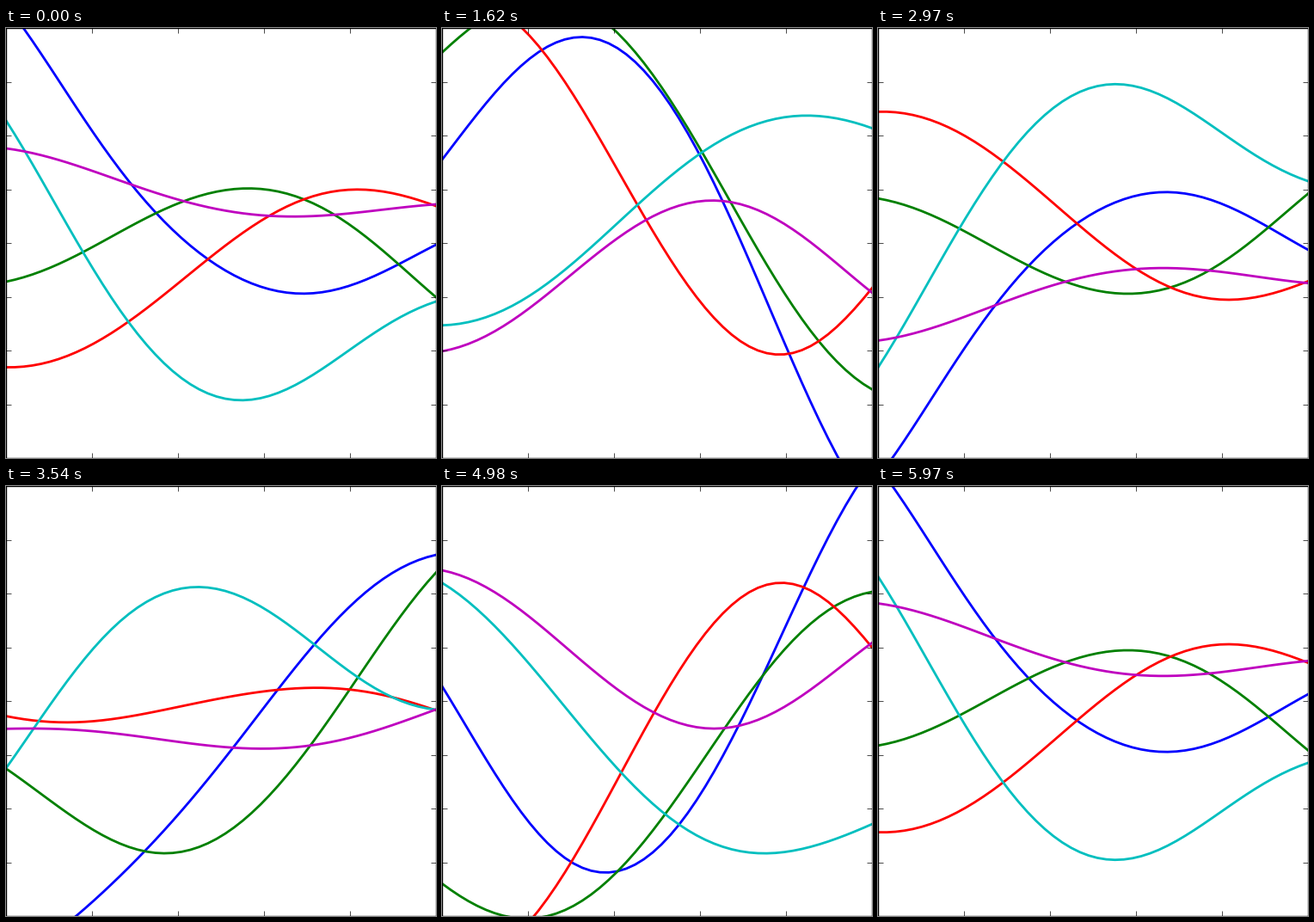
A matplotlib script that plays this animation: 500x500 px, repeating every 6000 ms.

```python
import numpy as np
import matplotlib.pyplot as plt
from matplotlib.animation import FuncAnimation

plt.style.use("classic")

SIZE = 500
FRAMES = 200
INTERVAL = 30
LENGTH = 1.7  # kernel length scale

# Heights at x = 0..5 as a + bj: each point swings as a cos(t) + b sin(t).
KEYS = {
    "b": [277 + 132.5j, 130.5 + 231j, 9.5 + 232j, -52 + 96j, -49.5 - 127.5j, -2 - 314j],
    "g": [-45 + 217.5j, -5 + 286j, 46 + 256j, 62.5 + 118.5j, 21 - 59j, -63 - 179.5j],
    "r": [-144.5 + 260.5j, -118 + 230j, -47 + 87j, 28 - 65j, 62 - 122.5j, 43 - 47.5j],
    "c": [142.5 - 78.5j, -28 - 66.5j, -154 + 0j, -179.5 + 82j, -124 + 132j, -68 + 126j],
    "m": [110 - 113j, 84 - 67j, 50.5 + 9j, 32 + 53j, 34.5 + 25.5j, 45 - 52.5j],
}

knots = np.arange(6.0)
x = np.linspace(0, 5, 50)


def kernel(p, q):
    return np.exp(-0.5 * ((p[:, None] - q) / LENGTH) ** 2)


def interpolate(keys):
    """Gaussian-process mean through the key points."""
    return kernel(x, knots) @ np.linalg.solve(kernel(knots, knots), keys)


fig = plt.figure(figsize=(SIZE / 100, SIZE / 100), dpi=100, facecolor="white")
ax = fig.add_axes([0, 0, 1, 1])
ax.set(xlim=(0, 5), ylim=(-250, 250),
       xticks=knots, yticks=np.linspace(-250, 250, 9),
       xticklabels=[], yticklabels=[])

curves = [(ax.plot([], [], color=color, lw=2)[0], interpolate(np.array(keys)))
          for color, keys in KEYS.items()]


def update(i):
    turn = np.exp(-2j * np.pi * i / FRAMES)
    for line, wave in curves:
        line.set_data(x, (wave * turn).real)
    return [line for line, _ in curves]


anim = FuncAnimation(fig, update, frames=FRAMES, interval=INTERVAL,
                     repeat=True, repeat_delay=0, blit=False)
plt.show()
```
